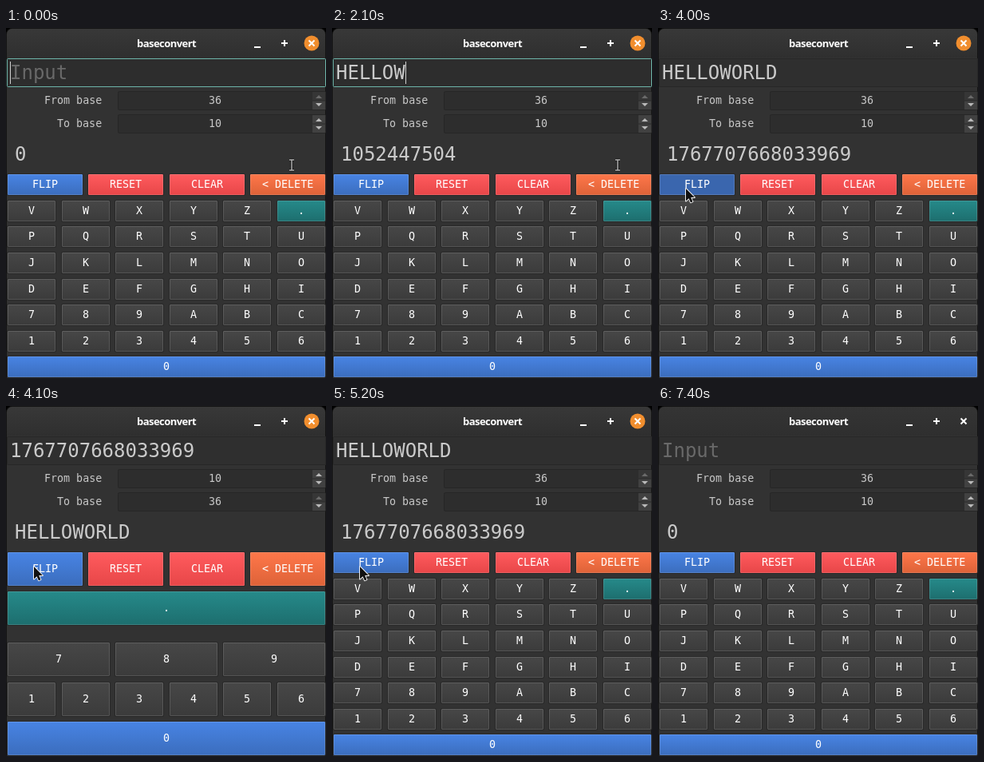
Animation of 401 by 438 pixels, one loop 7500 ms. Source, as an HTML page with a canvas:

```html
<!DOCTYPE html>
<html lang="en">
<head>
<meta charset="utf-8">
<title>baseconvert</title>
<style>
html, body { margin: 0; width: 100%; height: 100%; overflow: hidden; background: #000; }
canvas { display: block; }
</style>
</head>
<body>
<canvas id="stage" width="401" height="438"></canvas>
<script>
const ctx = document.getElementById('stage').getContext('2d');
const LOOP = 7500;
const MONO = '"DejaVu Sans Mono", monospace';
const SMALL = '13.333px ' + MONO;
const LARGE = '24px ' + MONO;

const WORD = 'HELLOWORLD';
const KEY_TIMES = [800, 900, 1300, 1500, 1600, 2100, 2200, 2300, 2700, 2700];

// Pointer stops; the last one lies outside the window.
const DELETE_KEY = { x: 329, y: 182 };
const FLIP_KEY = { x: 35, y: 201 };
const CLEAR_KEY = { x: 246, y: 200 };
const OUTSIDE = { x: 162, y: -66 };

// Top and bottom of each button gradient.
const COLORS = {
  gray: ['#474747', '#3b3b3b'],
  blue: ['#4884e4', '#3b6dbd'],
  blueDown: ['#3a66ae', '#3a66ae'],
  red: ['#ff5b5e', '#e74648'],
  redHover: ['#ff6669', '#fb5c60'],
  redDown: ['#c9464a', '#c9464a'],
  orange: ['#ff774a', '#dd6238'],
  teal: ['#268a8a', '#1d6e6e']
};

const within = (t, a, b) => t >= a && t < b;
const linear = u => u;
const smooth = u => u * u * (3 - 2 * u);

function glide(from, to, start, end, t, ease, sag = 0) {
  const u = Math.min(1, Math.max(0, (t - start) / (end - start)));
  const e = ease(u);
  return {
    x: from.x + (to.x - from.x) * e,
    y: from.y + (to.y - from.y) * e + sag * Math.sin(Math.PI * e)
  };
}

function pointerAt(time) {
  const t = Math.floor(time / 100) * 100;
  if (t < 5700) return glide(DELETE_KEY, FLIP_KEY, 3200, 3900, t, smooth, 11);
  if (t < 6700) return glide(FLIP_KEY, CLEAR_KEY, 5700, 6100, t, smooth);
  return glide(CLEAR_KEY, OUTSIDE, 6700, 7000, t, linear);
}

function box(x, y, w, h, fill, stroke, r = 0) {
  ctx.beginPath();
  ctx.roundRect(x, y, w, h, r);
  ctx.fillStyle = fill;
  ctx.fill();
  if (stroke) {
    ctx.beginPath();
    ctx.roundRect(x + .5, y + .5, w - 1, h - 1, r);
    ctx.strokeStyle = stroke;
    ctx.lineWidth = 1;
    ctx.stroke();
  }
}

function fade(y, h, top, bottom) {
  const g = ctx.createLinearGradient(0, y, 0, y + h);
  g.addColorStop(0, top);
  g.addColorStop(1, bottom);
  return g;
}

// Text starts on a whole pixel; anchor is 0 for left, .5 for centre, 1 for right.
function text(str, x, y, font, color, anchor = 0) {
  ctx.font = font;
  ctx.fillStyle = color;
  ctx.fillText(str, Math.round(x - anchor * ctx.measureText(str).width), y);
}

function path(points) {
  ctx.beginPath();
  points.forEach(([x, y]) => ctx.lineTo(x, y));
  ctx.closePath();
}

function lines(color, width, ...segments) {
  ctx.beginPath();
  for (const [x1, y1, x2, y2] of segments) {
    ctx.moveTo(x1, y1);
    ctx.lineTo(x2, y2);
  }
  ctx.strokeStyle = color;
  ctx.lineWidth = width;
  ctx.stroke();
}

function button(label, x, y, w, h, color) {
  box(x - 1, y - 1, w + 2, h + 2, '#292929', null, 2);
  box(x, y, w, h, fade(y, h, ...COLORS[color]), 'rgba(255, 255, 255, .13)', 1);
  text(label, x + w / 2, y + h / 2 + 4, SMALL, '#fff', .5);
}

function row(labels, y, h, colorOf) {
  const pitch = 405.3 / labels.length;
  const width = Math.round(pitch - 7.1);
  labels.forEach((label, i) => button(label, Math.round(2 + i * pitch), y, width, h, colorOf(label)));
}

function header(focused) {
  box(0, 0, 401, 438, '#141414', null, [8, 8, 0, 0]);
  box(1, 1, 399, 437, '#323232', null, [7, 7, 0, 0]);
  box(1, 1, 399, 36, fade(1, 36, focused ? '#383838' : '#343434', '#2f2f2f'), null, [7, 7, 0, 0]);
  ctx.letterSpacing = '-0.55px';
  text('baseconvert', 201, 24, 'bold 13px "Noto Sans", sans-serif', '#fff', .5);
  ctx.letterSpacing = '0px';
  lines('#fff', 2, [311, 24, 319, 24], [345, 19, 353, 19], [349, 15, 349, 23]);
  if (focused) {
    ctx.beginPath();
    ctx.arc(383, 19, 9.5, 0, 7);
    ctx.fillStyle = '#f18e2e';
    ctx.fill();
  }
  lines('#fff', 2, [379.5, 15.5, 386.5, 22.5], [386.5, 15.5, 379.5, 22.5]);
}

function entry(value, focused, caret) {
  box(1, 38, 400, 36, focused ? '#2d2d2d' : '#2f2f2f', focused ? '#6db5aa' : '#272727', 1);
  text(value || 'Input', 5, 64, LARGE, value ? '#cacaca' : '#696969');
  if (caret) {
    const x = Math.round(5 + ctx.measureText(value).width) + .5;
    lines('#d0d0d0', 1, [x, 42, x, 70]);
  }
}

function spinner(label, value, y) {
  const capped = value === 36;
  text(label, 120, y + 16, SMALL, '#c8c8c8', 1);
  box(140, y, 261, 24, '#2d2d2d', '#262626', 2);
  text(value, 262, y + 16, SMALL, '#c8c8c8', .5);
  box(384, y + 1, 16, 11, capped ? '#363636' : '#414141');
  box(384, y + 12, 16, 11, '#414141');
  lines('#2a2a2a', 1, [384, y + 12, 400, y + 12]);
  for (const dir of [-1, 1]) {
    const cy = y + 12 + 5 * dir;
    path([[388, cy - 2 * dir], [396, cy - 2 * dir], [392, cy + 2 * dir]]);
    ctx.fillStyle = capped && dir < 0 ? '#6a6a6a' : '#bababa';
    ctx.fill();
  }
}

function arrow({ x, y }) {
  path([[0, 0], [0, 15.5], [3.6, 12.2], [6, 17.4], [8.5, 16.3], [6.2, 11.1], [10.9, 11.1]]
    .map(([dx, dy]) => [x + dx, y + dy]));
  ctx.lineJoin = 'round';
  ctx.strokeStyle = '#fff';
  ctx.lineWidth = 1.8;
  ctx.stroke();
  ctx.fillStyle = '#111';
  ctx.fill();
}

function beam(x, y) {
  const bars = [[x, y - 6, x, y + 6], [x - 3, y - 6.5, x + 3, y - 6.5], [x - 3, y + 6.5, x + 3, y + 6.5]];
  lines('#111', 3, ...bars);
  lines('#fff', 1, ...bars);
}

function draw(t) {
  const count = t < 6400 ? KEY_TIMES.filter(k => k <= t).length : 0;
  const word = WORD.slice(0, count);
  const number = String(parseInt(word, 36) || 0);
  const flipped = within(t, 4100, 5200);
  const pointer = pointerAt(t);

  ctx.clearRect(0, 0, 401, 438);
  header(t < 7400);
  entry(flipped ? number : word, t < 4000, t < 3800);
  spinner('From base', flipped ? 10 : 36, 79);
  spinner('To base', flipped ? 36 : 10, 108);
  text(flipped ? word : number, 11, 166, LARGE, '#cacaca');

  const height = flipped ? 42 : 26;
  const hover = (a, b) => t >= 3200 && within(pointer.y, 183, 183 + height) && within(pointer.x, a, b);
  const colorOf = label => {
    switch (label) {
      case 'FLIP': return within(t, 4000, 4100) || within(t, 5000, 5200) ? 'blueDown' : 'blue';
      case 'RESET': return hover(103, 197) ? 'redHover' : 'red';
      case 'CLEAR': return within(t, 6300, 6400) ? 'redDown' : hover(205, 299) ? 'redHover' : 'red';
      case '< DELETE': return 'orange';
      case '.': return 'teal';
      case '0': return 'blue';
      default: return 'gray';
    }
  };
  const keys = flipped
    ? ['.', '789', '123456', '0']
    : ['VWXYZ.', 'PQRSTU', 'JKLMNO', 'DEFGHI', '789ABC', '123456', '0'];
  // Hidden rows leave a gap below the point key.
  const top = i => flipped ? 183 + 49.25 * (i + 1) + (i ? 14.8 : 0) : 183.3 + 32.57 * (i + 1);
  row(['FLIP', 'RESET', 'CLEAR', '< DELETE'], 183, height, colorOf);
  keys.forEach((k, i) => row([...k], Math.round(top(i)), height, colorOf));

  if (t < 3200) beam(358, 171.5);
  else arrow(pointer);
}

function tick() {
  draw(performance.now() % LOOP);
  requestAnimationFrame(tick);
}
tick();
</script>
</body>
</html>
```
